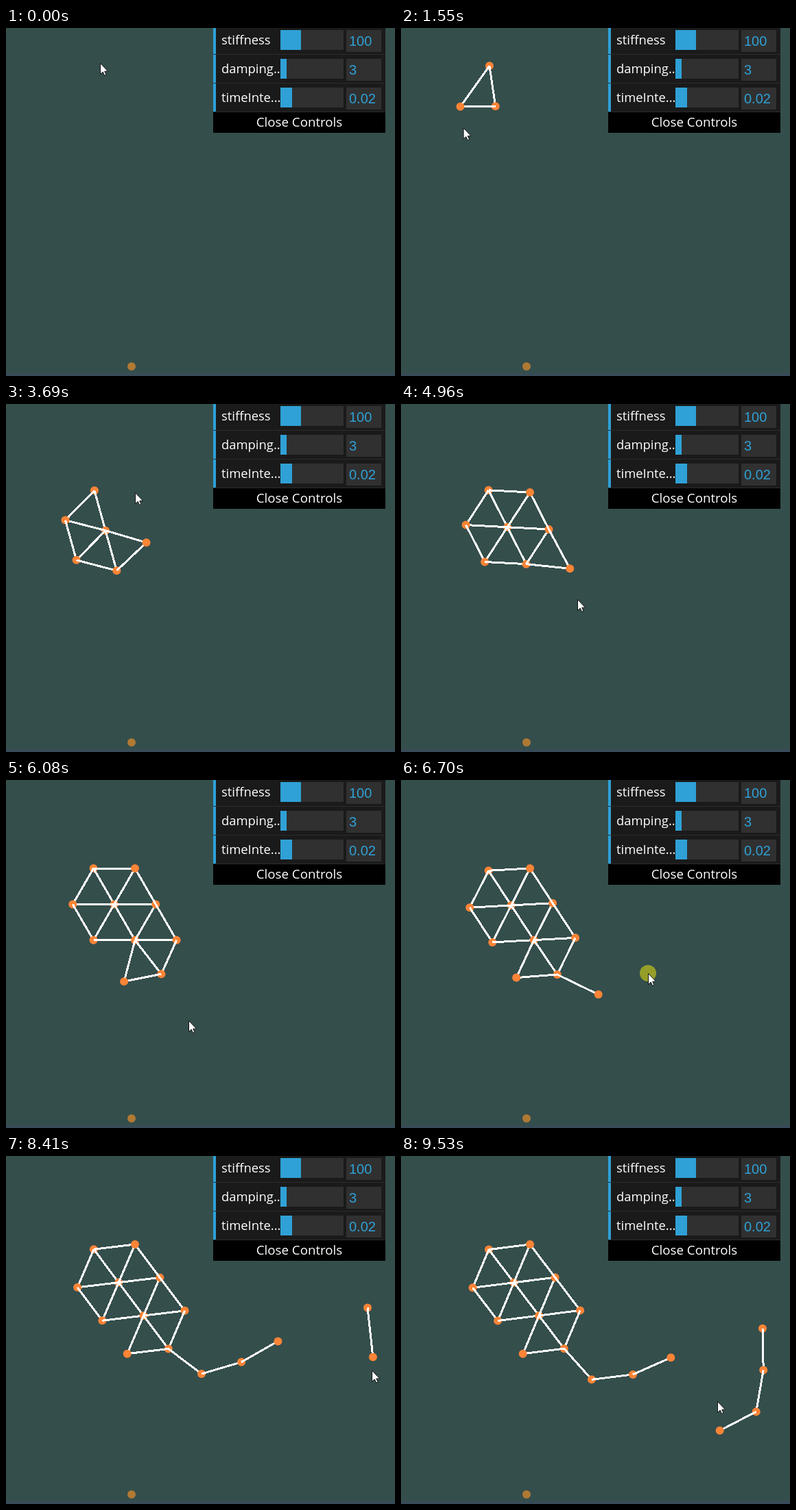
Animation of 567x508 px, one loop 9600 ms. Source, as an HTML page:

```html
<!DOCTYPE html>
<html lang="en">
<head>
<meta charset="utf-8">
<title>Mass spring sketch</title>
<style>
  html, body { margin: 0; width: 100%; height: 100%; overflow: hidden; background: #344e4c; }
  svg { display: block; width: 567px; height: 508px; }
  line { stroke: #fff; stroke-width: 3; shape-rendering: crispEdges; }
  .label { font: 18.4px "Open Sans", "Noto Sans", sans-serif; fill: #fff; }
  .close { font-size: 18.7px; text-anchor: middle; }
  .value { font: 20px "Liberation Sans", Arial, sans-serif; fill: #2fa1d6; }
</style>
</head>
<body>
<svg viewBox="0 0 567 508">
  <rect width="567" height="508" fill="#344e4c"/>
  <rect y="504" width="567" height="4" fill="#384b57"/>
  <circle cx="183" cy="494" r="6" fill="#b07934"/>
  <g id="panel"></g>
  <g id="scene"></g>
  <circle id="press" r="12" fill="#959e28"/>
  <path id="cursor" d="M.5 .5V16.5L4.2 13.1L6.6 18.3L9 17.2L6.7 12.2H11.6Z" fill="#fff" stroke="#111" stroke-width="1"/>
</svg>
<script>
const LOOP = 9600;
const PRESS = 110;    // ms the button is held
const REST = 60.5;    // spring length
const REACH = 90;     // a new node links to all nodes nearer than this
const SETTLE = 300;   // ms, decay of the stretch after a click
const $ = id => document.getElementById(id);
const mix = (a, b, u) => a + (b - a) * u;
const smooth = u => u * u * (3 - 2 * u);

function set(el, attrs) {
  for (const k in attrs) el.setAttribute(k, attrs[k]);
  return el;
}
function make(parent, tag, attrs, text) {
  const el = set(document.createElementNS("http://www.w3.org/2000/svg", tag), attrs);
  if (text) el.textContent = text;
  return parent.appendChild(el);
}

// Control panel
function box(x, y, width, height, fill) {
  make($("panel"), "rect", { x, y, width, height, fill });
}
function row(y, name, fill, value) {
  box(302, y - 3, 251, 42, "#1a1a1a");
  box(302, y - 3, 4, 42, "#2fa1d6");
  box(302, y + 35, 251, 1, "#2c2c2c");
  make($("panel"), "text", { x: 314, y: y + 21, class: "label" }, name);
  box(400, y, 92, 29, "#303030");
  box(400, y, fill, 29, "#2fa1d6");
  box(496, y, 51, 32, "#303030");
  make($("panel"), "text", { x: 500, y: y + 23, class: "value" }, value);
}
row(3, "stiffness", 30, "100");
row(45, "damping...", 9, "3");
row(87, "timeInte...", 17, "0.02");
box(302, 123, 251, 30, "#000");
make($("panel"), "text", { x: 427.5, y: 144, class: "label close" }, "Close Controls");

// Values on a list of [time, ...values]
function along(keys, t, ease = u => u) {
  const i = keys.findIndex(k => k[0] > t);
  if (i < 1) return keys.at(i).slice(1);
  const a = keys[i - 1], b = keys[i];
  const u = ease((t - a[0]) / (b[0] - a[0]));
  return a.slice(1).map((v, j) => mix(v, b[j + 1], u));
}

function step([x, y], degrees, length = REST) {
  const r = degrees * Math.PI / 180;
  return [x + length * Math.cos(r), y + length * Math.sin(r)];
}

// The triangle lattice falls, is caught at its corner, then swings: time, corner x, y, tilt
const swing = [[430, 199, 42, 10], [2030, 184, 76, 10], [2720, 183, 105, 10.5], [3810, 188, 146, 15],
  [4040, 188, 129, 14.5], [4960, 188, 129, 3], [6080, 188, 129, 0], [7380, 188, 129, -6.5], [9530, 188, 129, -7.2]];

// Where a node wants to be at time t: in the lattice, at the end of a link, or alone
const cell = (i, j) => t => {
  const [x, y, tilt] = along(swing, t);
  return step(step([x, y], tilt, i * REST), tilt + 60, j * REST);
};
const joint = (angle, turn) => (t, n) => step(place(n.prev, t), angle + turn * (t - n.t) / 1000);
const free = fall => (t, n) => [n.x, n.y + fall * (t - n.t) / 1000];

// A clicked node is pulled home by its springs
function place(n, t) {
  const [x, y] = n.home(t, n), [x0, y0] = n.home(n.t, n);
  const k = Math.exp((n.t - t) / SETTLE);
  return [x + (n.x - x0) * k, y + (n.y - y0) * k];
}

const nodes = [];
function click(t, x, y, home, prev = nodes.at(-1)) {
  const n = { t, x, y, home, prev, links: [] };
  for (const m of nodes) {
    const [mx, my] = place(m, t);
    if (Math.hypot(mx - x, my - y) < REACH) m.links.push({ to: n });
  }
  nodes.push(n);
  return n;
}
click(430, 140, 31, cell(-1, 0));
click(1150, 108, 112, cell(-1, 1));
click(1450, 86, 118, cell(-2, 1));
click(1800, 98, 190, cell(-2, 2));
click(2350, 176, 217, cell(-1, 2));
click(2950, 214, 200, cell(0, 1));
click(3810, 188, 129, free(0));
click(4500, 247, 258, cell(0, 2));
const tip = click(5600, 255, 272, cell(-1, 3));
click(5850, 187, 303, cell(-2, 3));
click(6300, 295, 333, joint(16, 10), tip);
click(6800, 360, 282, joint(-30, 8.4));
click(7440, 418, 242, joint(-35, 5.3));
click(8060, 527, 212, free(27));
click(8330, 537, 295, joint(89, 0));
click(8700, 520, 372, joint(100, 0));
click(9110, 472, 403, joint(156, 0));

for (const n of nodes) {
  n.dot = make($("scene"), "circle", { r: 6, fill: "#fb8436" });
  for (const l of n.links) l.line = make($("scene"), "line", {});
}

// The pointer rests on every click, with a few stops between
const path = [[0, 137, 51], [2030, 144, 212], [2720, 195, 217], [3300, 221, 235],
  [4960, 257, 285], [6080, 266, 351], [9530, 461, 358]];
for (const n of nodes) path.push([n.t - PRESS, n.x, n.y], [n.t, n.x, n.y]);
path.sort((a, b) => a[0] - b[0]);

const shown = on => on ? "visible" : "hidden";

function draw(t) {
  for (const n of nodes) {
    n.on = t >= n.t;
    n.at = place(n, Math.max(t, n.t));
  }
  for (const n of nodes) {
    const [x, y] = n.at;
    set(n.dot, { cx: x, cy: y, visibility: shown(n.on) });
    for (const { to, line } of n.links) {
      set(line, { x1: x, y1: y, x2: to.at[0], y2: to.at[1], visibility: shown(to.on) });
    }
  }
  const hit = nodes.find(n => t >= n.t - PRESS && t < n.t);
  set($("press"), { visibility: shown(hit) });
  if (hit) set($("press"), { cx: hit.x, cy: hit.y });
  const [x, y] = along(path, t, smooth);
  set($("cursor"), { transform: `translate(${x} ${y})` });
}

const start = performance.now();
function tick() {
  draw((performance.now() - start) % LOOP);
  requestAnimationFrame(tick);
}
draw(0);
requestAnimationFrame(tick);
</script>
</body>
</html>
```
